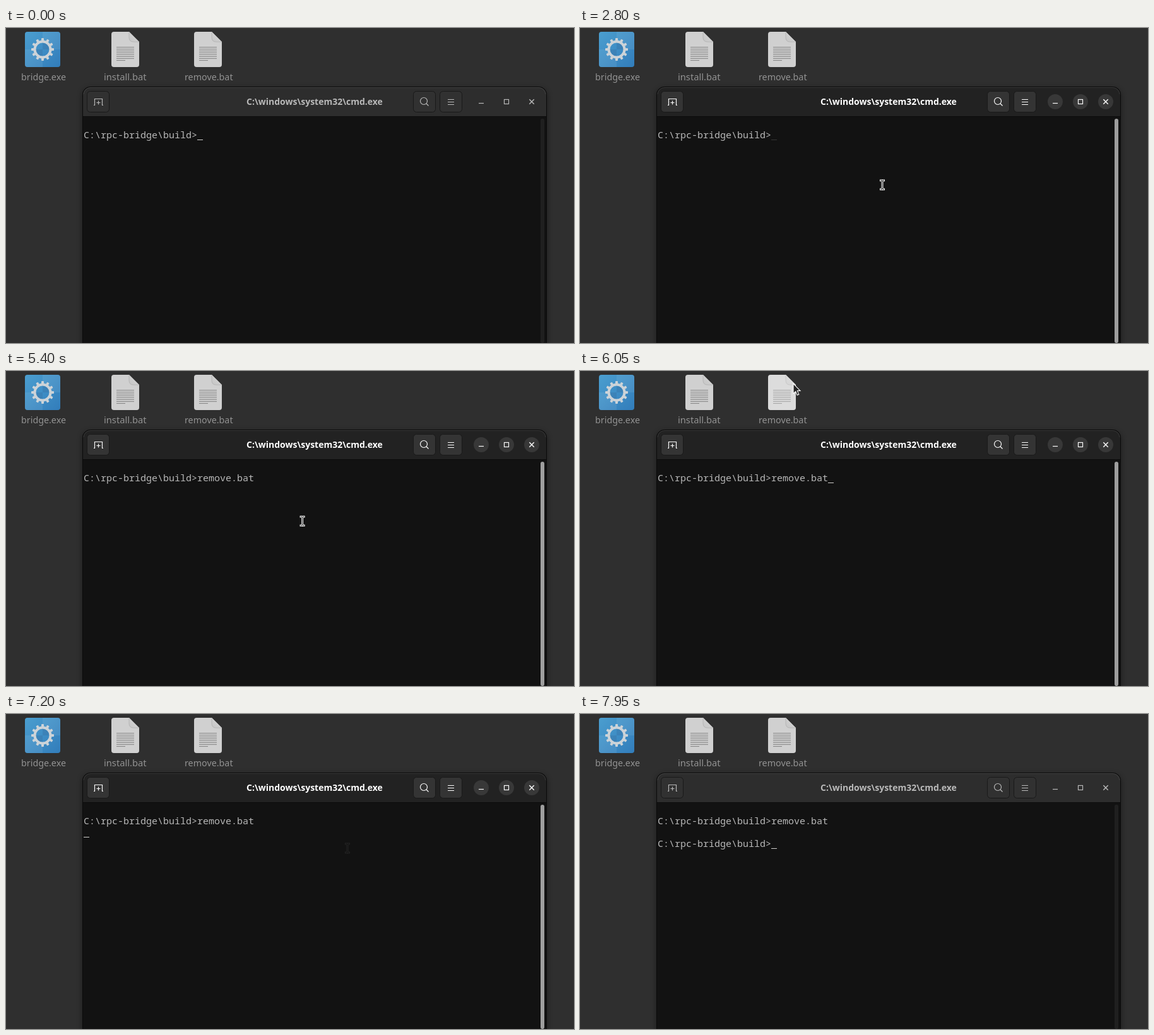
An HTML page for the animation above (8000 ms loop, 900x500 px).

```html
<!DOCTYPE html>
<html lang="en">
<head>
<meta charset="utf-8">
<title>Terminal</title>
<style>
  html, body { margin: 0; width: 100%; height: 100%; overflow: hidden; background: #2f2f2f; }
  svg { display: block; width: 900px; height: 500px; }
  .label { font: 14.3px "Noto Sans", "Open Sans", sans-serif; fill: #929292; }
  .title { font: bold 14px "Noto Sans", "Open Sans", sans-serif; text-anchor: middle; }
  .term { font: 15px "Noto Sans Mono", "DejaVu Sans Mono", monospace; fill: #b8b8b8; white-space: pre; }
</style>
</head>
<body>
<svg viewBox="0 0 900 500">
  <defs>
    <linearGradient id="blue" x1="0" y1="0" x2="1" y2="1">
      <stop offset="0" stop-color="#4b9ecf"/><stop offset="1" stop-color="#327dbb"/>
    </linearGradient>
    <linearGradient id="fold" x1="0" y1="1" x2="1" y2="0">
      <stop offset="0" stop-color="#c4c4c4"/><stop offset="1" stop-color="#dadada"/>
    </linearGradient>
    <filter id="soft" x="-10%" y="-10%" width="120%" height="120%"><feGaussianBlur stdDeviation="5"/></filter>
    <clipPath id="tile"><rect x="30" y="6" width="56" height="56" rx="4"/></clipPath>
    <path id="page" d="M4 0H28L44 16V52a4 4 0 0 1-4 4H4a4 4 0 0 1-4-4V4a4 4 0 0 1 4-4Z"/>
    <g id="doc">
      <use href="#page" fill="#d0d0d0"/>
      <path d="M28 0L44 16H35Q28 16 28 9Z" fill="url(#fold)"/>
      <path d="M28 .5V9Q28 16 35 16H43.5" fill="none" stroke="#b0b0b0" stroke-width=".8"/>
      <path id="rows" stroke="#858585" stroke-width="1.1"/>
    </g>
    <path id="ibeam" d="M-2.5-7H-1L0-6L1-7H2.5M0-6V6M-2.5 7H-1L0 6L1 7H2.5"/>
  </defs>

  <rect width="900" height="500" fill="#2f2f2f"/>

  <g clip-path="url(#tile)">
    <rect x="30" y="6" width="56" height="56" fill="url(#blue)"/>
    <path d="M58 6h28v28H58ZM30 34h28v28H30Z" fill="#fff" opacity=".07"/>
    <path d="M58 34V23a11 11 0 0 1 11 11ZM58 34V45a11 11 0 0 1-11-11Z" fill="#1d5f98" opacity=".35"/>
  </g>
  <circle cx="58" cy="34" r="12.5" fill="none" stroke="#ccd3d8" stroke-width="4"/>
  <g id="teeth" fill="#ccd3d8"></g>

  <use href="#doc" x="167" y="6"/>
  <use href="#doc" x="298" y="6"/>
  <use id="glow" href="#page" x="298" y="6" fill="#fff"/>

  <text class="label" x="24" y="83">bridge.exe</text>
  <text class="label" x="155" y="83" style="font-size:14.7px">install.bat</text>
  <text class="label" x="283" y="83">remove.bat</text>

  <rect x="121" y="96" width="736" height="440" rx="12" opacity=".42" filter="url(#soft)"/>
  <rect x="121.5" y="93.5" width="735" height="440" rx="12" fill="#121212" stroke="#0a0a0a"/>
  <path id="head" d="M122 140V106a12 12 0 0 1 12-12H844a12 12 0 0 1 12 12V140Z"/>
  <path d="M123 105a11 11 0 0 1 11-10.5H844a11 11 0 0 1 11 10.5" fill="none" stroke="#fff" opacity=".1"/>
  <path d="M122 140.5H856" stroke="#0c0c0c"/>

  <g id="btns" stroke="#191919">
    <rect x="128.5" y="100.5" width="35" height="33" rx="5"/>
    <rect x="645.5" y="100.5" width="35" height="33" rx="5"/>
    <rect x="687.5" y="100.5" width="35" height="33" rx="5"/>
  </g>
  <g id="discs" fill="#383838">
    <circle cx="753" cy="117" r="12"/><circle cx="793" cy="117" r="12"/><circle cx="833" cy="117" r="12"/>
  </g>
  <g id="icons" fill="none" stroke-width="1.2">
    <path d="M139 122.5H140.5V112.5H152.5V122.5H154M143.5 118.5H149.5M146.5 115.5V121.5"/>
    <circle cx="662" cy="116" r="5.5"/><path d="M666 120L669.5 123.5"/>
    <path d="M700 113.5H710M700 117.5H710M700 121.5H710"/>
    <path d="M749 119.5H757"/>
    <rect x="789.5" y="113.5" width="7" height="7"/>
    <path d="M829.3 113.3L836.7 120.7M836.7 113.3L829.3 120.7" stroke-width="1.5"/>
  </g>
  <text id="title" class="title" x="489" y="122">C:\windows\system32\cmd.exe</text>
  <rect id="bar" x="847" y="144" width="6" height="356" rx="3"/>

  <text id="row1" class="term" x="123" y="175"></text>
  <text id="row2" class="term" x="123" y="211"></text>
  <rect id="caret" width="9" height="1" fill="#d0cfcc" shape-rendering="crispEdges"/>

  <g id="pointer">
    <g id="beam" fill="none" stroke-linecap="square">
      <use href="#ibeam" stroke="#fff" stroke-width="3"/>
      <use href="#ibeam" stroke="#111"/>
    </g>
    <path id="arrow" d="M0 0V15.5L3.7 12.2L6.2 18L8.8 16.9L6.3 11.2H11Z" fill="#222" stroke="#fff" stroke-width="1.1"/>
  </g>
</svg>

<script>
const LOOP = 8000, STEP = 50, BLINK = 585;
const CLICK = 1000, TYPE = 3700, TYPED = 4800, MOVE = 5400, ENTER = 7200, DONE = 7700;
const PROMPT = 'C:\\rpc-bridge\\build>', COMMAND = 'remove.bat';

const $ = id => document.getElementById(id);
const set = (id, name, value) => $(id).setAttribute(name, value);
const part = (t, from, to) => Math.min(1, Math.max(0, (t - from) / (to - from)));
const ease = k => k * k * (3 - 2 * k);
const mix = (a, b, k) => a + (b - a) * k;
const gray = (a, b, k) => `rgb(${Array(3).fill(Math.round(mix(a, b, k)))})`;

// How far the pointer has left the terminal for the file icon
const away = t => ease(part(t, 5340, 5800)) - ease(part(t, 6450, 6950));

// Slide in from the top, circle the icon, come back to the terminal
function pointerAt(t) {
  const k = away(t), slide = part(t, 600, 950);
  const rest = t < 6100 ? [mix(562, 479, slide), mix(0, 249, slide)] : [541, 213];
  const turn = (t - 6050) / 82 - 0.75;
  const orbit = [308 + 41 * Math.cos(turn), 40 + 29 * Math.sin(turn)];
  return rest.map((v, i) => mix(v, orbit[i], k));
}

function pointerAlpha(t) {
  if (t < 600 || t >= DONE) return 0;
  if (t >= ENTER) return 0.07;
  return t < TYPE || t >= MOVE ? 1 : 0;
}

// Blinking restarts after each action and pauses without focus or while typing
function caretAlpha(t) {
  if (t < CLICK || (t >= TYPE && t < TYPED)) return 1;
  const since = [DONE, ENTER, TYPED, CLICK].find(at => t >= at);
  if (Math.floor((t - since) / BLINK) % 2 === 0) return 1;
  return since === CLICK ? 0.18 : 0;
}

function caretAt(t, count) {
  if (t >= DONE) return [303, 213];
  return t >= ENTER ? [123, 195] : [303 + count * 9, 177];
}

function draw(t) {
  const f = part(t, CLICK, 1150) - part(t, DONE, 7950);
  set('head', 'fill', gray(45, 34, f));
  set('btns', 'fill', gray(49, 52, f));
  set('icons', 'stroke', gray(184, 250, f));
  set('title', 'fill', gray(184, 255, f));
  set('bar', 'fill', gray(32, 158, f));
  set('discs', 'opacity', f);
  set('glow', 'opacity', part(away(t), 0.7, 1) * 0.25);

  const count = t < TYPE ? 0 : 1 + Math.floor(part(t, TYPE, TYPED) * (COMMAND.length - 1));
  $('row1').textContent = PROMPT + COMMAND.slice(0, count);
  $('row2').textContent = t >= DONE ? PROMPT : '';
  const [cx, cy] = caretAt(t, count);
  set('caret', 'x', cx);
  set('caret', 'y', cy);
  set('caret', 'opacity', caretAlpha(t));

  const [x, y] = pointerAt(t);
  set('pointer', 'transform', `translate(${x.toFixed(1)} ${y.toFixed(1)})`);
  set('pointer', 'opacity', pointerAlpha(t));
  set('beam', 'display', y > 140 ? 'inline' : 'none');
  set('arrow', 'display', y > 140 ? 'none' : 'inline');
}

let rows = '', teeth = '';
for (let i = 0; i < 8; i++) rows += `M8 ${24.5 + i * 3}H${i === 7 ? 22 : 36}`;
for (let i = 0; i < 12; i++)
  teeth += `<rect x="56" y="16" width="4" height="5" rx="1" transform="rotate(${i * 30} 58 34)"/>`;
set('rows', 'd', rows);
$('teeth').innerHTML = teeth;

const start = performance.now();
function tick() {
  const t = (performance.now() - start) % LOOP;
  draw(Math.floor(t / STEP) * STEP);
  requestAnimationFrame(tick);
}
draw(0);
requestAnimationFrame(tick);
</script>
</body>
</html>
```
